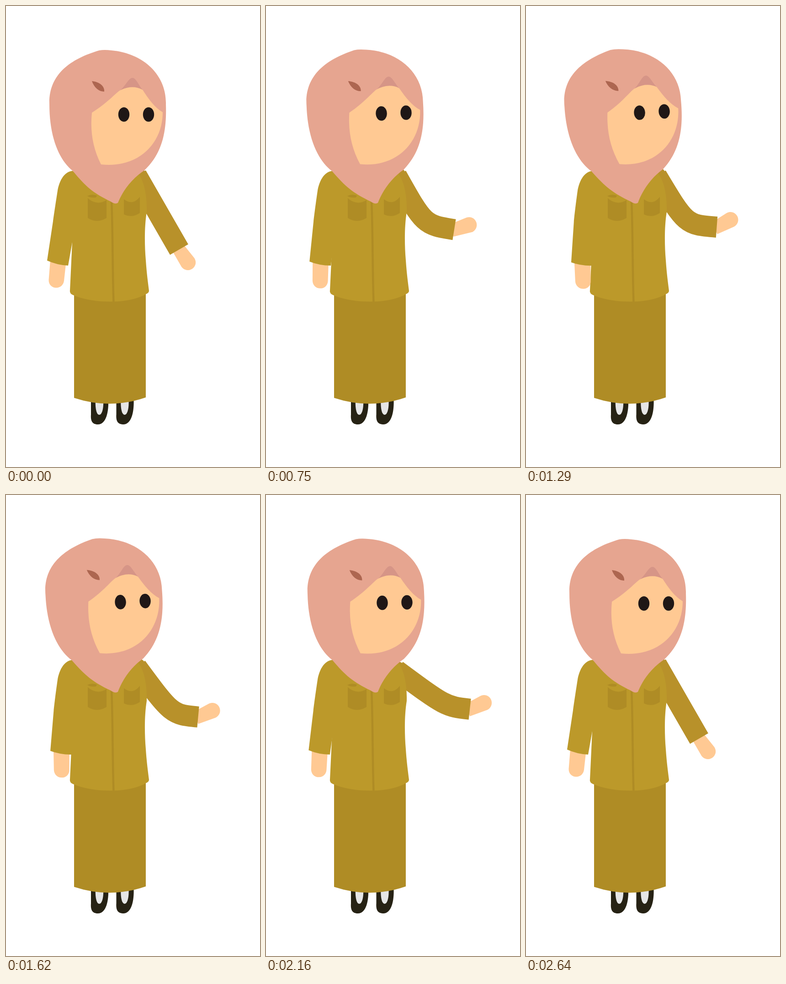
Animation of 556x1007 px, one loop 2.7 s. Source, as an HTML page:

```html
<!DOCTYPE html>
<html lang="en">
<head>
<meta charset="utf-8">
<title>Waving figure</title>
<style>
  html, body { margin: 0; width: 100%; height: 100%; overflow: hidden; background: #fff; }
  svg { display: block; width: 100%; height: 100%; }
  .shirt { fill: #bc992a; }
  .sleeve { fill: #b8912a; }
  .dark { fill: #af8c25; }
  .skin { fill: #ffc993; }
  .scarf { fill: #e6a590; }
  .eye { fill: #1f1716; }
</style>
</head>
<body>
<svg viewBox="0 0 556 1007">
  <defs>
    <g id="foot">
      <path fill="#262214" d="M186,860 H224 C225,885 220,914 201,914 C188,914 185,905 186,892 Z"/>
      <path fill="#e6e6e6" d="M196,860 H213 C214,880 210,893 204,893 C198,893 195,878 196,860 Z"/>
    </g>
  </defs>
  <use href="#foot"/>
  <use href="#foot" x="55.5"/>
  <path class="dark" d="M149,620 H306 V855 Q228,882 149,856 Z"/>

  <path id="palm" class="skin" d="M-6,-14 L34,-17 A17,17 0 0 1 34,17 L-6,14 Z"/>
  <circle id="joint" class="sleeve" r="18"/>
  <path id="arm" fill="none" stroke="#b8912a" stroke-width="46"/>

  <path class="shirt" d="M150,375 L240,380 L288,364 C302,381 309,412 308,450 C303,480 303,520 306,555
    C308,585 311,605 313,622 Q313,627 306,629.5 C270,651 190,651 146,631 Q139,628 140,621 L145,515 Z"/>
  <path class="skin" data-warp="limb" d="M97,555 L93.500,598 C93,608 100,615.500 110,615.500 C119,615.500 126,609 127,600 L132,555 Z"/>
  <path class="shirt" data-warp="limb" d="M146,360 C125,362 116,386 113,403 C108,435 104,462 103,470 L90,556 Q112,566 136,567 L145,516 L165,430 L190,400 Z"/>
  <path fill="none" stroke="#af8c25" stroke-width="4.500" d="M231,424 C234,500 233,580 235.500,646"/>
  <g class="dark">
    <path d="M178,415 Q186,410 199,414 L197,418 Q186,420 178,415 Z"/>
    <path d="M179,420 Q199,437 220,424 V463 Q199,476 179,463 Z"/>
    <path d="M258,422 Q277,437 293,417 V452 Q276,464 258,455 Z"/>
  </g>

  <path class="scarf" data-warp="head" d="M204,97 Q215,95 231,97 C300,103 352,150 350,215 C352,275 342,322 303,359
    C278,375 256,402 245,430 Q239,434 229,427 C190,408 175,395 146,360 C118,338 95,290 95,215 C93,150 140,116 204,97 Z"/>
  <path fill="#d69587" data-warp="head" d="M249,185 C262,175 268,157 277,157 C285,157 291,175 300,184 L277,190 Z"/>
  <path class="skin" data-warp="head" d="M188,233 C222,212 240,190 250,184 Q277,171 299,183 C313,205 326,222 343,232
    C343,300 290,355 208,346 C190,310 184,275 188,233 Z"/>
  <path fill="#ad6650" data-warp="head" d="M188,164 C205,166 216,175 215,187 C203,187 193,178 188,164 Z"/>
  <ellipse class="eye" rx="12.200" ry="15.800" data-x="258"/>
  <ellipse class="eye" rx="12.200" ry="15.800" data-x="312"/>
</svg>
<script>
const LOOP = 2700, HALF = 1320, STEP = 30;
const $ = id => document.getElementById(id);
const clamp = v => Math.min(1, Math.max(0, v));

// time, shoulder y, elbow x y, wrist x y, hand angle
const poses = [
  [0, 370.4, 338, 461, 379, 532, 55.6],
  [390, 371, 349, 480, 398.5, 506, 8],
  [750, 371, 346, 478, 412, 488.5, -17.7],
  [1290, 371, 350, 478, 417.5, 483, -28],
  [1950, 381, 379, 478, 427, 484.5, -19.5],
  [2170, 383, 393, 462, 446, 468, -24],
  [2340, 381, 369, 478, 416.5, 492, -9.5],
  [2640, 370.4, 338, 461, 379, 532, 55.6]
];

function slope(i, k) {
  const a = poses[Math.max(0, i - 1)], b = poses[Math.min(poses.length - 1, i + 1)];
  return (b[k] - a[k]) / (b[0] - a[0]);
}

// Hermite curve through the poses
function poseAt(t) {
  const last = poses.length - 1;
  if (t >= poses[last][0]) return poses[last];
  let i = 0;
  while (t >= poses[i + 1][0]) i++;
  const a = poses[i], b = poses[i + 1], span = b[0] - a[0], u = (t - a[0]) / span;
  const mix = u * u * (3 - 2 * u);
  return a.map((v, k) => v + (b[k] - v) * mix
    + span * (slope(i, k) * u * (1 - u) ** 2 - slope(i + 1, k) * u * u * (1 - u)));
}

const warps = {
  head(x, y, p) {
    const u = Math.max(0, 425 - y);
    return [x - p * (0.04 * u + 0.00006 * u * u), y - p * 0.055 * (x - 185) * clamp(u / 150)];
  },
  limb(x, y, p) {
    const u = Math.max(0, y - 400) / 160;
    return [x + p * 9.6 * u * u, y + p * 0.09 * (136 - x) * clamp(u)];
  }
};

const soft = [...document.querySelectorAll('[data-warp]')].map(el =>
  ({ el, d: el.getAttribute('d'), warp: warps[el.dataset.warp] }));
const eyes = [...document.querySelectorAll('.eye')];

function blink(t) {
  const u = clamp(1 - Math.abs(t - 2400) / 150);
  return 1 - 0.55 * u * u * (3 - 2 * u);
}

function draw(t) {
  const p = clamp(1 - Math.abs(t - HALF) / HALF);
  for (const { el, d, warp } of soft) {
    el.setAttribute('d', d.replace(/([\d.]+),([\d.]+)/g, (m, x, y) =>
      warp(+x, +y, p).map(v => v.toFixed(2)).join()));
  }
  for (const eye of eyes) {
    const [x, y] = warps.head(+eye.dataset.x, 237, p);
    eye.setAttribute('transform', `translate(${x} ${y}) rotate(${-3 * p}) scale(${blink(t)})`);
  }
  const [, sy, ex, ey, wx, wy, turn] = poseAt(t);
  $('arm').setAttribute('d', `M286,${sy} C${ex},${ey} ${ex},${ey} ${wx},${wy}`);
  $('joint').setAttribute('transform', `translate(288 ${sy - 1})`);
  $('palm').setAttribute('transform', `translate(${wx} ${wy}) rotate(${turn})`);
}

const start = performance.now();
function tick() {
  const t = (performance.now() - start) % LOOP;
  draw(Math.floor(t / STEP) * STEP);
  requestAnimationFrame(tick);
}
tick();
</script>
</body>
</html>
```
